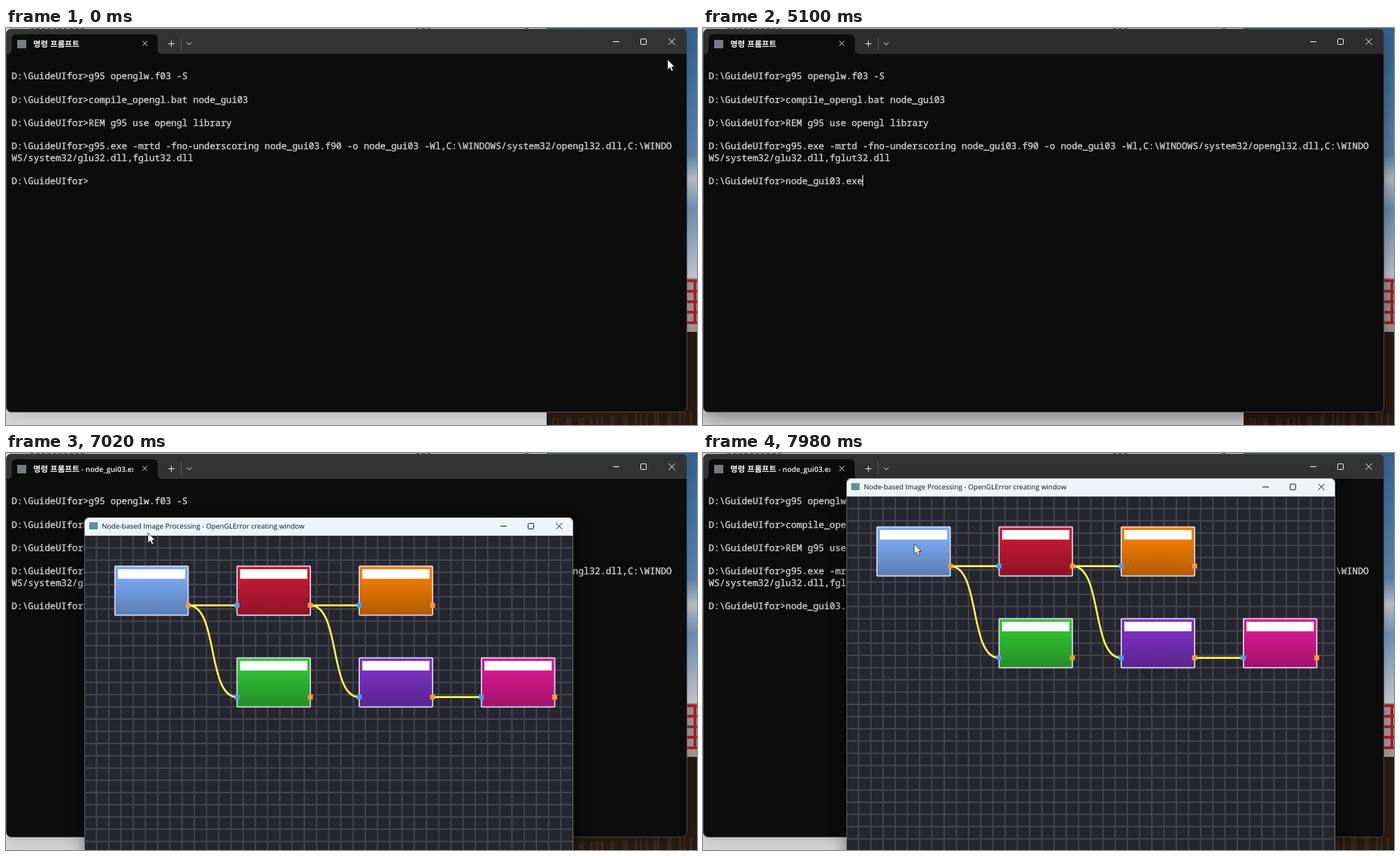
Write an HTML page that moves like this. It is 988x567 px and loops after 8000 ms.

```html
<!DOCTYPE html>
<html lang="ko">
<head>
<meta charset="utf-8">
<title>Terminal and node editor</title>
<style>
  html, body { margin: 0; width: 100%; height: 100%; overflow: hidden; background: #0c0c0c; }
  svg { display: block; width: 988px; height: 567px; }
  text { white-space: pre; text-rendering: geometricPrecision; }
  .mono { font: 500 13.11px "Noto Sans Mono", "DejaVu Sans Mono", monospace; fill: #ccc; stroke: #ccc; stroke-width: .4; }
  .tab { font: 700 11.4px "Noto Sans CJK KR", "Noto Sans CJK", "Noto Sans CJK JP", sans-serif; fill: #fff; }
  .tab tspan { font: 600 10.4px "Open Sans", "Noto Sans", sans-serif; }
  .caption { font: 10px "Open Sans", "Noto Sans", sans-serif; fill: #111; }
  .icon { fill: none; stroke-width: 1; }
  #frame { filter: drop-shadow(0 6px 10px rgba(0, 0, 0, .14)); }
  #frame.active { filter: drop-shadow(0 10px 14px rgba(0, 0, 0, .4)); }
  #app { filter: drop-shadow(0 8px 12px rgba(0, 0, 0, .42)); }
</style>
</head>
<body>
<svg viewBox="0 0 988 567">
  <defs>
    <linearGradient id="sky" x2="0" y2="1">
      <stop offset="0" stop-color="#336293"/>
      <stop offset=".18" stop-color="#3f6f9f"/>
      <stop offset=".5" stop-color="#5c83aa"/>
      <stop offset=".6" stop-color="#b5c0cc"/>
      <stop offset=".72" stop-color="#6d8fb2"/>
      <stop offset="1" stop-color="#c6cbd1"/>
    </linearGradient>
    <linearGradient id="nodeShade" x2="0" y2="1">
      <stop offset=".2" stop-opacity="0"/>
      <stop offset="1" stop-opacity=".27"/>
    </linearGradient>
    <clipPath id="titleClip"><rect x="36" y="9" width="146" height="28"/></clipPath>
    <clipPath id="appClip"><rect width="699" height="550" rx="7"/></clipPath>
    <pattern id="grid" width="20" height="20" patternUnits="userSpaceOnUse">
      <path d="M0 0H20V20H0Z" fill="#262630" stroke="#47474f" stroke-width="2"/>
    </pattern>
  </defs>

  <!-- desktop -->
  <rect width="773" height="567" fill="#d9d7d8"/>
  <path d="M35 .5H113M586 .5h24M742 .5h7" stroke="#777" stroke-dasharray="5 3"/>
  <rect x="773" width="215" height="360" fill="url(#sky)"/>
  <rect x="773" y="357" width="215" height="78" fill="#9a9695"/>
  <g id="railing" stroke="#b01c22" stroke-width="4"></g>
  <rect x="773" y="424" width="215" height="10" fill="#a09a92"/>
  <rect x="773" y="434" width="215" height="133" fill="#291b12"/>
  <path id="streaks" stroke="#4a3521" stroke-width="3" opacity=".6"/>

  <!-- terminal -->
  <rect id="frame" x=".5" y="1.5" width="973" height="547" rx="7" fill="#0c0c0c"/>
  <path id="bar" d="M1 37V9Q1 2 8 2H966Q973 2 973 9V37Z"/>
  <rect x=".5" y="1.5" width="973" height="547" rx="7" fill="none" stroke="#4b4c50"/>
  <path d="M2 37Q8 37 8 31V16Q8 9 15 9H210Q217 9 217 16V31Q217 37 223 37Z" fill="#0c0c0c"/>
  <rect x="16" y="17" width="13" height="12" fill="#777a80"/>
  <g clip-path="url(#titleClip)">
    <text class="tab" x="39" y="26.5">명령 프롬프트<tspan id="running"> - node_gui03.exe</tspan></text>
  </g>
  <path class="icon" stroke="#e8e8e8" d="M195 18.5l7 7m0-7l-7 7M232 22.5h9M236.5 18v9M258.5 20.5l3.5 3.5 3.5-3.5"/>
  <path class="icon" stroke="#555" d="M250.5 13v18"/>
  <g id="terminalButtons" transform="translate(868 15)" stroke="#fff"></g>
  <g id="lines"></g>
  <rect id="caret" width="1" height="16" fill="#fff"/>

  <!-- node editor -->
  <g id="app">
    <g clip-path="url(#appClip)">
      <rect width="699" height="550" fill="#eff4fb"/>
      <g transform="translate(0 26) scale(.8735)">
        <rect width="800" height="600" fill="url(#grid)"/>
        <g id="graph"></g>
      </g>
    </g>
    <rect x="7" y="7" width="12" height="10" fill="#5d9491"/>
    <text class="caption" x="25" y="16.3">Node-based Image Processing - OpenGLError creating window</text>
    <g id="appButtons" transform="translate(595 8)" stroke="#111"></g>
    <rect x=".5" y=".5" width="698" height="549" rx="7" fill="none" stroke="#777" stroke-opacity=".55"/>
  </g>

  <!-- pointer -->
  <path id="arrow" d="M0 0V14.5L3.3 11.4 5.6 16.6 8 15.5 5.7 10.5H10Z" fill="#fff" stroke="#222" stroke-width=".8"/>
  <path id="beam" d="M-3.5-8.5h7M0-8.5v17M-3.5 8.5h7" fill="none" stroke="#fff"/>
</svg>

<script>
const LOOP = 8000, STEP = 60;
const CHAR = 7.867, LEFT = 8;
const PROMPT = 'D:\\GuideUIfor>', COMMAND = 'node_gui03.exe';
const FOCUS = 720, BLINK = 540, TYPE = 1440, RESUME = 2700, ENTER = 5340, OPEN = 5520;
const HISTORY = [
  PROMPT + 'g95 openglw.f03 -S', '',
  PROMPT + 'compile_opengl.bat node_gui03', '',
  PROMPT + 'REM g95 use opengl library', '',
  PROMPT + 'g95.exe -mrtd -fno-underscoring node_gui03.f90 -o node_gui03 -Wl,C:\\WINDOWS/system32/opengl32.dll,C:\\WINDO',
  'WS/system32/glu32.dll,fglut32.dll', ''
];

// Key points, joined by eased moves.
const point = (time, x, y) => ({ time, x, y });
const APP = [
  point(6840, -180, -20), point(7020, 112, 92), point(7260, 153, 38), point(7500, 205, 36)
];
const HOVER = [point(0, 946, 45), point(360, 500, 249), point(540, 412, 231)];
const LEAVE = [point(5760, 412, 231), point(6180, -30, 0)];
const DRAG = [
  point(6840, -110, 0), point(7020, 203, 114), point(7260, 228, 45),
  point(7500, 281, 48), point(7680, 272, 85), point(7980, 302, 130)
];

const node = (column, row, color) => ({ x: 50 + column * 200, y: 50 + row * 150, color });
const blue = node(0, 0, '#7aabf3'), red = node(1, 0, '#c21a34'), orange = node(2, 0, '#f27d00');
const green = node(1, 1, '#31c233'), purple = node(2, 1, '#7b31c2'), pink = node(3, 1, '#da1990');
const NODES = [blue, red, orange, green, purple, pink];
const LINKS = [[blue, red], [blue, green], [red, orange], [red, purple], [purple, pink]];
const NODE_WIDTH = 120, PORT_Y = 64;

const $ = id => document.getElementById(id);
const clamp = k => Math.min(1, Math.max(0, k));
const smooth = k => k * k * (3 - 2 * k);

function add(parent, tag, attrs, text = '') {
  const el = document.createElementNS('http://www.w3.org/2000/svg', tag);
  for (const name in attrs) el.setAttribute(name, attrs[name]);
  el.textContent = text;
  return parent.appendChild(el);
}

function addLine(text, row) {
  return add($('lines'), 'text', { class: 'mono', x: LEFT, y: 73.3 + row * 16.6 }, text);
}

function buildButtons(group) {
  add(group, 'path', { class: 'icon', d: 'M0 4.5h9M79.5 0l9 9m0-9l-9 9' });
  add(group, 'rect', { class: 'icon', x: 39.5, y: 0.5, width: 8, height: 8, rx: 1 });
}

function buildGraph() {
  const graph = $('graph');
  const port = (x, y, fill) => add(graph, 'rect', { x: x - 4, y: y - 4, width: 8, height: 8, fill });
  for (const [from, to] of LINKS) {
    const x1 = from.x + NODE_WIDTH, y1 = from.y + PORT_Y, y2 = to.y + PORT_Y;
    add(graph, 'path', {
      d: `M${x1} ${y1}C${x1 + 50} ${y1} ${to.x - 50} ${y2} ${to.x} ${y2}`,
      fill: 'none', stroke: '#ffff4d', 'stroke-width': 3
    });
  }
  for (const { x, y, color } of NODES) {
    const box = { x, y, width: NODE_WIDTH, height: 80, rx: 1 };
    add(graph, 'rect', { ...box, fill: color });
    add(graph, 'rect', { ...box, fill: 'url(#nodeShade)', stroke: '#dcd8ee', 'stroke-width': 2 });
    add(graph, 'rect', { x: x + 5, y: y + 5, width: 110, height: 15.5, fill: '#fff' });
    if (color !== blue.color) port(x, y + PORT_Y, '#4d99ff');
    port(x + NODE_WIDTH, y + PORT_Y, '#ff9933');
  }
}

function buildBackdrop() {
  for (let y = 361; y < 424; y += 15) add($('railing'), 'path', { d: `M973 ${y}h15` });
  add($('railing'), 'path', { d: 'M985 359v64' });
  let d = '';
  for (let x = 782; x < 988; x += 9) d += `M${x + 3 * Math.sin(x)} ${553 + 4 * Math.sin(x * 7)}V567`;
  $('streaks').setAttribute('d', d);
}

function positionAt(path, t) {
  const next = path.findIndex(p => p.time > t);
  if (next < 0) return path[path.length - 1];
  if (next === 0) return path[0];
  const a = path[next - 1], b = path[next];
  const k = smooth((t - a.time) / (b.time - a.time));
  return { x: a.x + (b.x - a.x) * k, y: a.y + (b.y - a.y) * k };
}

// "node" comes at an even pace; the rest follows after a pause.
function typedCount(t) {
  if (t < TYPE) return 0;
  if (t < RESUME) return Math.min(4, 1 + Math.floor((t - TYPE) / 200));
  return Math.min(COMMAND.length, 5 + Math.floor((t - RESUME) / 266));
}

function place(el, x, y, extra = '') {
  el.setAttribute('transform', `translate(${x} ${y})${extra}`);
}

function show(el, visible) {
  el.setAttribute('visibility', visible ? 'visible' : 'hidden');
}

function drawTerminal(t) {
  const active = t >= FOCUS && t < OPEN, entered = t >= ENTER;
  const typed = typedCount(t);
  $('bar').setAttribute('fill', active ? '#2d2d2d' : '#333');
  $('frame').classList.toggle('active', active);
  input.textContent = PROMPT + COMMAND.slice(0, typed);
  show($('running'), entered);

  show($('caret'), active && (t < FOCUS + BLINK || t >= TYPE));
  if (entered) place($('caret'), LEFT, 227);
  else place($('caret'), Math.floor(LEFT + (PROMPT.length + typed) * CHAR), 210);
}

function drawApp(t) {
  const opened = clamp((t - OPEN + STEP) / 300);
  const eased = 1 - (1 - opened) ** 3, scale = 0.9 + 0.1 * eased;
  const { x, y } = positionAt(APP, t);
  show($('app'), opened > 0);
  $('app').setAttribute('opacity', eased);
  place($('app'), x + 349.5 * (1 - scale), y + 275 * (1 - scale), ` scale(${scale})`);
}

function drawPointer(t) {
  const path = t < TYPE ? HOVER : t < DRAG[0].time ? LEAVE : DRAG;
  const { x, y } = positionAt(path, t);
  const overText = t >= STEP && t < TYPE;
  show($('beam'), overText);
  show($('arrow'), t < STEP || t >= LEAVE[0].time);
  place($(overText ? 'beam' : 'arrow'), x, y);
}

HISTORY.forEach(addLine);
const input = addLine(PROMPT, HISTORY.length);
buildButtons($('terminalButtons'));
buildButtons($('appButtons'));
buildGraph();
buildBackdrop();

const start = performance.now();
function tick() {
  const elapsed = (performance.now() - start) % LOOP;
  const t = Math.floor(elapsed / STEP) * STEP;
  drawTerminal(t);
  drawApp(t);
  drawPointer(t);
  requestAnimationFrame(tick);
}
tick();
</script>
</body>
</html>
```
